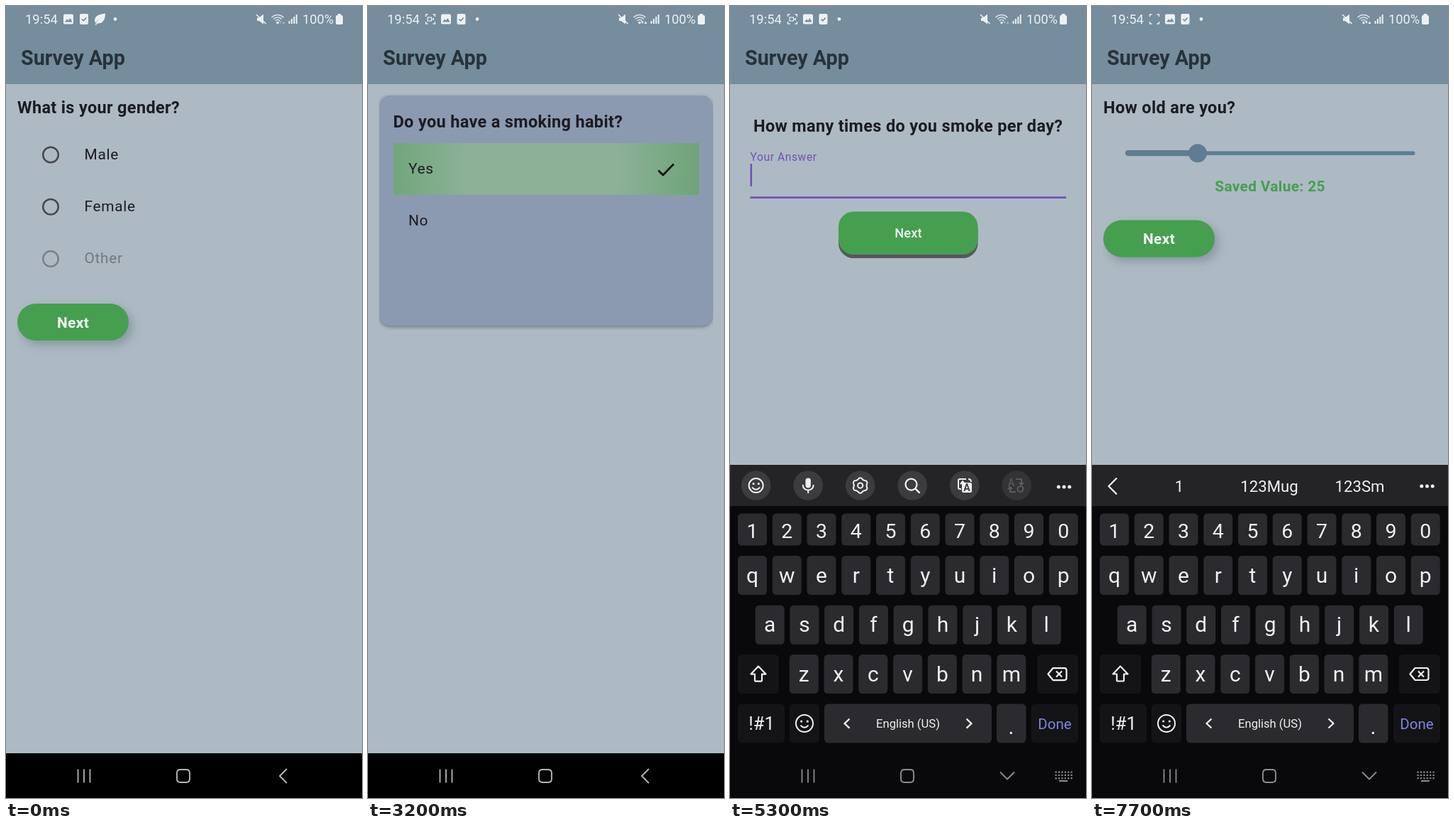
Recreate the animation shown at these times as an HTML page with a canvas. Size 502 by 1115 pixels, loop 8 s.

```html
<!DOCTYPE html>
<html lang="en">
<head>
<meta charset="utf-8">
<title>Survey App</title>
<style>
html, body { margin: 0; width: 100%; height: 100%; overflow: hidden; background: #adbac3; }
canvas { display: block; width: 502px; height: 1115px; }
</style>
</head>
<body>
<canvas id="stage" width="502" height="1115"></canvas>
<script>
const ctx = document.getElementById('stage').getContext('2d');
const LOOP = 8000, PAGE_W = 470;
const BG = '#adbac3', INK = '#1d1b22', GREEN = '#459f4f', PURPLE = '#7150bd', SLATE = '#5f7d91', LIGHT = '#edf1f3';
const KB_INK = '#f1f1f2', KEY = '#2b2a2e', KEY_DARK = '#141316';

const clamp = v => Math.max(0, Math.min(1, v));
const ramp = (t, start, length) => clamp((t - start) / length);

// cubic-bezier(.42, 0, .58, 1)
function easeInOut(x) {
  let lo = 0, hi = 1;
  for (let i = 0; i < 20; i++) {
    const u = (lo + hi) / 2, v = 1 - u;
    if (1.26 * v * v * u + 1.74 * v * u * u + u * u * u < x) lo = u; else hi = u;
  }
  return lo * lo * (3 - 2 * lo);
}

function text(str, x, y, size, color, { weight = 400, align = 'left', spacing = 0 } = {}) {
  ctx.font = `${weight} ${size}px Roboto, sans-serif`;
  ctx.letterSpacing = spacing + 'px';
  ctx.textAlign = align;
  ctx.fillStyle = color;
  ctx.fillText(str, x, y);
}

function box(x, y, w, h, r, color) {
  ctx.fillStyle = color;
  ctx.beginPath();
  ctx.roundRect(x, y, w, h, r);
  ctx.fill();
}

function disc(x, y, r, color) {
  ctx.fillStyle = color;
  ctx.beginPath();
  ctx.arc(x, y, r, 0, Math.PI * 2);
  ctx.fill();
}

function ring(x, y, r, width, color) {
  ctx.strokeStyle = color;
  ctx.lineWidth = width;
  ctx.beginPath();
  ctx.arc(x, y, r, 0, Math.PI * 2);
  ctx.stroke();
}

// SVG path data around a centre point
function stroke(d, x, y, width, color) {
  ctx.save();
  ctx.translate(x, y);
  ctx.strokeStyle = color;
  ctx.lineWidth = width;
  ctx.lineJoin = 'round';
  ctx.stroke(new Path2D(d));
  ctx.restore();
}

function fill(d, x, y, color) {
  ctx.save();
  ctx.translate(x, y);
  ctx.fillStyle = color;
  ctx.fill(new Path2D(d));
  ctx.restore();
}

function withShadow(color, blur, dx, dy, draw) {
  ctx.save();
  ctx.shadowColor = color;
  ctx.shadowBlur = blur;
  ctx.shadowOffsetX = dx;
  ctx.shadowOffsetY = dy;
  draw();
  ctx.restore();
}

// ---- status bar ----

function pictureIcon(x) {
  box(x - 7, 11.5, 14, 14, 2, LIGHT);
  fill('M-5 4 L-2 0 L0 2 L2.5 -1.5 L5.5 4Z', x, 18.5, '#748c9b');
}

function checkIcon(x) {
  box(x - 6, 11, 12, 15, 2, LIGHT);
  stroke('M-3 0 L-.7 2.4 L3.2 -2', x, 18.5, 1.6, '#748c9b');
}

function recordIcon(x, camera) {
  stroke('M-3.5 -6.5H-6.5V-3.5M3.5 -6.5H6.5V-3.5M-6.5 3.5V6.5H-3.5M6.5 3.5V6.5H3.5', x, 18.5, 1.4, LIGHT);
  if (!camera) return;
  ctx.strokeStyle = LIGHT;
  ctx.lineWidth = 1.2;
  ctx.strokeRect(x - 4, 16, 5.5, 5);
  fill('M2 0 L4.8 -2.2 V2.2Z', x, 18.5, LIGHT);
}

function statusBar(t) {
  text('19:54', 27, 25, 18.4, LIGHT);
  if (t < 100) {
    pictureIcon(88);
    checkIcon(110);
    fill('M8 -8 C0 -7 -7 -5 -7 2 Q-7 4 -5.5 5 Q-2 0 3 -3 Q-3 1 -6.5 8 H-4.5 L-3.5 6 C5 7 8 0 8 -8Z', 132, 18.5, LIGHT);
  } else {
    const blink = t < 6900 ? (t - 100) % 1000 < 500 : t >= 7000 && t < 7550;
    recordIcon(88, blink);
    pictureIcon(110);
    checkIcon(131.5);
  }
  disc(154, 18.5, 2.4, LIGHT);

  fill('M-6 -2 H-3 L3 -7 V7 L-3 2.5 H-6Z', 360, 18.5, LIGHT);
  stroke('M-7 -6.5 L6.5 6.5', 360, 18.5, 1.6, LIGHT);
  const busy = (t >= 1000 && t < 4000) || t >= 7000;
  for (const r of [4.5, 8, 11.5]) {
    ctx.strokeStyle = 'rgba(237,241,243,.85)';
    ctx.lineWidth = 1.6;
    ctx.beginPath();
    ctx.arc(383, 24, r, -Math.PI * .76, -Math.PI * .24);
    ctx.stroke();
  }
  disc(383, 23.5, 1.8, LIGHT);
  const arrow = busy ? LIGHT : 'rgba(237,241,243,.4)';
  fill('M-3 0 H1 L-1 3.5Z', 388, 21.5, arrow);
  fill('M0 3.5 H4 L2 0Z', 389.5, 21.5, arrow);
  for (let i = 0; i < 4; i++) {
    const h = 4 + i * 3;
    box(398.5 + i * 3.4, 25 - h, 2, h, .5, LIGHT);
  }
  text('100%', 418, 25, 18.2, LIGHT);
  box(465, 13, 10, 13, 1.8, LIGHT);
  box(467.5, 11, 5, 3, 1, LIGHT);
}

// ---- survey pages ----

const question = (str, x, y) => text(str, x, y, 23.5, INK, { weight: 700, spacing: .33 });
const option = (str, x, y, color = INK) => text(str, x, y, 20.9, color, { spacing: .65 });

function pillButton(y) {
  withShadow('rgba(70,85,100,.35)', 13, 5, 6, () => box(16, y, 157, 52, 26, GREEN));
  text('Next', 94.5, y + 33.5, 20.9, '#f4f8f4', { weight: 700, align: 'center', spacing: .33 });
}

function genderPage() {
  question('What is your gender?', 16, 151);
  ['Male', 'Female', 'Other'].forEach((label, i) => {
    const y = 209.5 + i * 73.2, off = i === 2;
    ring(63, y, 10.8, 2.5, off ? '#7a828a' : '#49454f');
    option(label, 110.5, y + 6.5, off ? '#70787f' : INK);
  });
  pillButton(419);
}

function habitPage(t) {
  withShadow('rgba(50,60,75,.5)', 5, 0, 2, () => box(16, 126, 470, 324, 15, '#8b9ab1'));
  question('Do you have a smoking habit?', 35.5, 170.5);
  const chosen = t >= 3000;
  if (chosen) box(36, 193, 431, 73, 0, '#6fa57a');
  if (t >= 2760 && t < 3600) {
    const radius = 240 * Math.sqrt(ramp(t, 2760, 440));
    const alpha = .24 * (1 - ramp(t, 3200, 400));
    const glow = ctx.createRadialGradient(245, 230, 0, 245, 230, Math.max(1, radius));
    glow.addColorStop(0, `rgba(230,215,240,${alpha})`);
    glow.addColorStop(.46, `rgba(230,215,240,${alpha})`);
    glow.addColorStop(.9, 'rgba(230,215,240,0)');
    ctx.fillStyle = glow;
    ctx.fillRect(36, 193, 431, 73);
  }
  option('Yes', 57, 236);
  option('No', 57, 309);
  if (chosen) stroke('M-10.5 1.5 L-4 8 L11 -7.5', 420, 230, 2.7, '#08090a');
}

function amountPage(t) {
  const typed = t >= 6100;
  question('How many times do you smoke per day?', 33, 177);
  text('Your Answer', 28.5, 218, 15.7, PURPLE, { spacing: .55 });
  if (typed) option('1', 28.5, 245.5);
  box(typed ? 42 : 28.5, 222, 2.6, 32, 1, PURPLE);
  box(28.5, 268.3, 445.5, 2.7, 0, PURPLE);
  box(153, 295, 196.5, 60, 21, '#55575c');
  box(153, 289.5, 196.5, 60.5, 21, GREEN);
  text('Next', 251.5, 326, 18.3, '#f2f7f2', { weight: 500, align: 'center', spacing: .13 });
}

function agePage() {
  question('How old are you?', 16, 151);
  box(47, 204.5, 408.5, 5.4, 2.7, SLATE);
  box(47, 203, 102, 8.2, 4.1, SLATE);
  disc(149, 207.2, 13, SLATE);
  text('Saved Value: 25', 251, 261, 20.9, GREEN, { weight: 700, align: 'center', spacing: .33 });
  pillButton(301.5);
}

const PAGES = [genderPage, habitPage, amountPage, agePage];

function pagePosition(t) {
  if (t >= 7150) return 2 + easeInOut(ramp(t, 7065, 500));
  if (t >= 5060) return 2;
  if (t >= 4960) return 1 + easeInOut(ramp(t, 4960, 500));
  return easeInOut(ramp(t, 960, 500));
}

function pages(t) {
  const position = pagePosition(t);
  ctx.save();
  ctx.beginPath();
  ctx.rect(15.5, 110, 471.2, 942);
  ctx.clip();
  PAGES.forEach((draw, i) => {
    const shift = (i - position) * PAGE_W;
    if (Math.abs(shift) >= PAGE_W) return;
    ctx.save();
    ctx.translate(shift, 0);
    draw(t);
    ctx.restore();
  });
  ctx.restore();
}

// ---- keyboard (drawn in its raised position) ----

const centred = (str, x, y, size, color = KB_INK) => text(str, x, y, size, color, { align: 'center' });

function smiley(x, y, r, color, laugh) {
  ring(x, y, r, 2, color);
  disc(x - r * .36, y - r * .25, 1.6, color);
  disc(x + r * .36, y - r * .25, 1.6, color);
  if (laugh) {
    fill('M-6 1.5 H6 C5 8 -5 8 -6 1.5Z', x, y, color);
    disc(x + 9.5, y + 9, 2, color);
  } else {
    stroke('M-5.5 2.5 Q0 9 5.5 2.5', x, y, 2, color);
  }
}

function gear(x, y) {
  const d = [];
  for (let i = 0; i < 48; i++) {
    const a = i / 48 * Math.PI * 2, r = 9 + 1.6 * clamp(.5 + Math.cos(a * 6) * 1.2);
    d.push(`${(r * Math.sin(a)).toFixed(1)} ${(-r * Math.cos(a)).toFixed(1)}`);
  }
  stroke('M' + d.join('L') + 'Z', x, y, 2, KB_INK);
  ring(x, y, 3.6, 2, KB_INK);
}

function dots(x, y) {
  for (const dx of [-7.7, 0, 7.7]) disc(x + dx, y, 2.5, KB_INK);
}

function toolbar(t) {
  box(0, 646, 502, 58, 0, '#242326');
  if (t >= 6200) {
    stroke('M6 -11.5 L-5.5 0 L6 11.5', 29, 676, 2.2, KB_INK);
    centred('1', 123, 684, 22.2);
    centred('123Mug', 250, 684, 22.2);
    centred('123Sm', 377.5, 684, 22.2);
    dots(472.5, 676);
    return;
  }
  for (let i = 0; i < 6; i++) disc(36.7 + i * 73.5, 675, 20.8, i === 5 ? '#343336' : '#3c3b3e');
  smiley(36.7, 675, 10, KB_INK, t >= 5450);
  box(106.5, 664.5, 7.4, 14, 3.7, KB_INK);
  stroke('M-7.5 -1 C-7.5 9 7.5 9 7.5 -1 M0 6.5 V11', 110.2, 675, 2, KB_INK);
  gear(183.7, 675);
  ring(255.5, 673.5, 8, 2.2, KB_INK);
  stroke('M4.5 4.5 L10.5 10.5', 257, 675, 2.4, KB_INK);
  stroke('M-5 5 H-7 Q-9 5 -9 3 V-7 Q-9 -9 -7 -9 H2 M-6 -2 L-3 -6 L0 -2 M-3 -6 V1 M5 -9 Q9 -9 9 -5', 331, 675, 2, KB_INK);
  box(327, 671, 14, 14, 2.5, KB_INK);
  text('A', 334, 683, 14, '#3c3b3e', { weight: 700, align: 'center' });
  const dim = '#615f63';
  text('A', 392, 676, 14, dim);
  ring(409.5, 680, 4, 1.8, dim);
  stroke('M0 -9 H8 V-1 M5 -4 L8 -1 L11 -4 M0 9 H-8 V3 M-11 5 L-8 2 L-5 5', 403, 675, 1.8, dim);
  dots(471, 677);
}

function keyRow(chars, x, y, h, size, pressed) {
  [...chars].forEach((char, i) => {
    const left = x + i * 48.75;
    box(left, y, 41, h, 5.5, char === pressed ? '#55545a' : KEY);
    centred(char, left + 20.5, y + h / 2 + (h < 50 ? 11.5 : 10), size);
  });
}

function keyboard(t) {
  box(0, 704, 502, 900, 0, '#09080b');
  toolbar(t);
  keyRow('1234567890', 11, 714.5, 45, 28.5, t >= 5980 && t < 6150 ? '1' : '');
  keyRow('qwertyuiop', 11, 774, 55, 30);
  keyRow('asdfghjkl', 35.7, 843.7, 55, 30);
  keyRow('zxcvbnm', 83.8, 913, 55, 30);

  box(11, 913, 58, 55, 5.5, KEY_DARK);
  stroke('M0 -11 L10.5 0 H5 V9 Q5 10 4 10 H-4 Q-5 10 -5 9 V0 H-10.5Z', 40, 940.5, 2.2, KB_INK);
  box(433, 913, 58, 55, 5.5, KEY_DARK);
  stroke('M-13 0 L-6 -8.5 H10 Q13 -8.5 13 -5.5 V5.5 Q13 8.5 10 8.5 H-6Z M-1.5 -4 L6.5 4 M6.5 -4 L-1.5 4', 461.5, 940.5, 2.2, KB_INK);

  box(11, 982.5, 66, 55, 5.5, KEY_DARK);
  centred('!#1', 44.5, 1019, 25.5);
  box(84, 982.5, 42, 55, 5.5, KEY_DARK);
  smiley(105, 1010, 12, KB_INK);
  box(133, 982.5, 236, 55, 5.5, KEY);
  stroke('M3.5 -6.5 L-3.5 0 L3.5 6.5', 165, 1010, 2.3, KB_INK);
  stroke('M-3.5 -6.5 L3.5 0 L-3.5 6.5', 337, 1010, 2.3, KB_INK);
  centred('English (US)', 251, 1016, 16.6);
  box(376, 982.5, 41.5, 55, 5.5, KEY);
  centred('.', 396.5, 1025, 30);
  box(425, 982.5, 66, 55, 5.5, KEY_DARK);
  centred('Done', 458, 1018, 20.5, '#7e86e0');
}

function navigation(keyboardShown) {
  const color = keyboardShown ? '#8d8d8f' : '#b5b5b5';
  for (const x of [101.5, 110, 118.5]) box(x - .9, 1074.5, 1.8, 19, 0, color);
  stroke('M-4 -9 H4 Q9 -9 9 -4 V4 Q9 9 4 9 H-4 Q-9 9 -9 4 V-4 Q-9 -9 -4 -9Z', 250, 1084, 1.9, color);
  if (!keyboardShown) {
    stroke('M5 -10 L-5 0 L5 10', 391, 1084, 1.9, color);
    return;
  }
  stroke('M-10 -5 L0 5 L10 -5', 391, 1083.5, 1.9, color);
  for (let row = 0; row < 3; row++)
    for (let col = 0; col < 6; col++)
      box(458.5 + col * 4.4, 1077.5 + row * 4.3, 2.2, 2.2, 0, color);
  box(464, 1090, 12, 2, 0, color);
}

function draw(t) {
  box(0, 0, 502, 1115, 0, BG);
  box(0, 0, 502, 110, 0, '#758d9c');
  statusBar(t);
  text('Survey App', 21, 83, 28.75, '#27323b', { weight: 700 });
  pages(t);
  box(0, 1052, 502, 63, 0, '#000');
  const keyboardShown = t >= 5030;
  if (keyboardShown) {
    ctx.save();
    ctx.translate(0, 469 * (1 - ramp(t, 5030, 285)) ** 3);
    keyboard(t);
    ctx.restore();
  }
  navigation(keyboardShown);
}

const begin = performance.now();
function tick() {
  draw((performance.now() - begin) % LOOP);
  requestAnimationFrame(tick);
}
tick();
</script>
</body>
</html>
```
